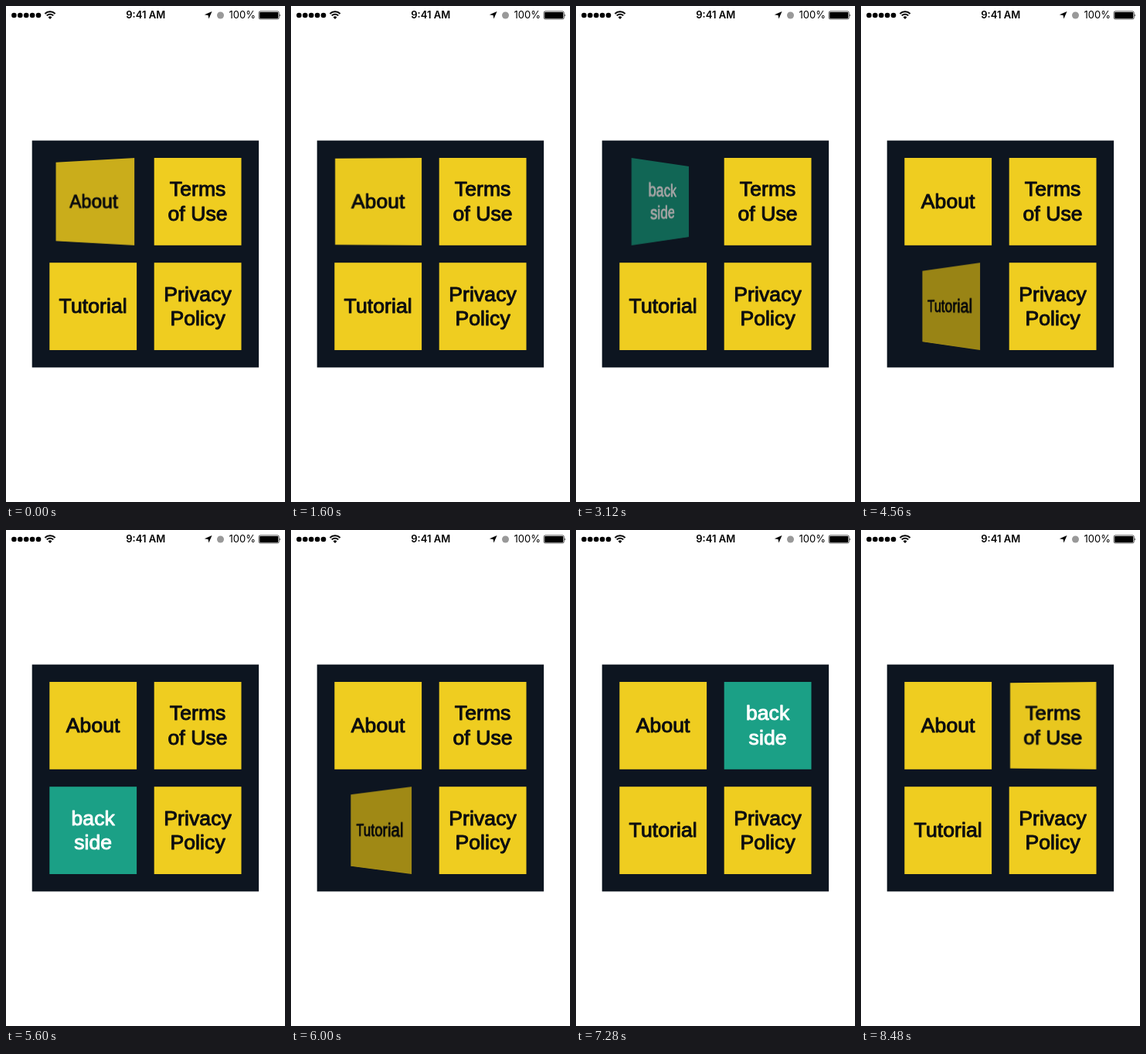
Recreate the animation shown at these times as an HTML page. Size 361 px wide and 640 px high, loop 8.56 s.

```html
<!DOCTYPE html>
<html lang="en">
<head>
<meta charset="utf-8">
<title>Flip tiles</title>
<style>
  html, body { margin: 0; width: 100%; height: 100%; overflow: hidden; background: #fff; }
  #scene { position: absolute; left: 0; top: 0; font-family: Inter, sans-serif; font-size: 13px; }
  .slot { position: absolute; width: 114px; height: 114px; perspective: 326px; perspective-origin: 56.8px 56.5px; }
  .face { width: 114px; height: 114px; transform-origin: 56.8px 56.5px; }
  .face svg { display: block; }
  .face text {
    font-family: "Liberation Sans", Arial, sans-serif; font-size: 26.5px; letter-spacing: .1px;
    text-anchor: middle; stroke-width: 1px; stroke-linejoin: round;
  }
  .front rect { fill: #efcd20; }
  .front text { fill: #0b0d10; stroke: #0b0d10; }
  .back rect { fill: #1ba086; }
  .back text { fill: #fff; stroke: #fff; }
</style>
</head>
<body>
<svg id="scene" width="361" height="640" viewBox="0 0 361 640">
  <g id="signal"></g>
  <g fill="none" stroke="#000" stroke-width="1.9">
    <path d="M50.4 10 A9.3 9.3 0 0 1 63.6 10"/>
    <path d="M52.7 12.4 A6 6 0 0 1 61.3 12.4"/>
  </g>
  <path d="M57 17 L54.6 14.4 A3.4 3.4 0 0 1 59.4 14.4 Z"/>
  <text x="180.7" y="16.3" text-anchor="middle" font-weight="600">9:41 AM</text>
  <path d="M266.5 7 L262.4 16.6 L261.6 11.9 L256.8 11.2 Z"/>
  <circle cx="277.5" cy="12" r="4.5" fill="#999"/>
  <text x="323" y="16.3" text-anchor="end">100%</text>
  <rect x="327.2" y="6.9" width="26" height="10" rx="1.8" fill="none" stroke="#000" stroke-width=".7"/>
  <rect x="328.2" y="7.9" width="24" height="8" rx=".8"/>
  <path d="M354 10.2 Q355.8 12 354 13.8 Z"/>
  <rect x="33.7" y="173.6" width="293.4" height="292.8" fill="#0d1520"/>
</svg>
<script>
const LOOP = 8560, STEP = 80, FLIP = 550, SIZE = 112.8;

// Each flip is [start, direction]: 1 turns to the back, -1 returns to the front.
const tiles = [
  { x: 56, y: 196, lines: ["About"], flips: [[-406, -1], [1544, 1], [2916, -1]] },
  { x: 191.4, y: 196, lines: ["Terms", "of Use"], flips: [[6690, 1], [8000, -1]] },
  { x: 56, y: 331.2, lines: ["Tutorial"], flips: [[4357, 1], [5647, -1]] },
  { x: 191.4, y: 331.2, lines: ["Privacy", "Policy"], flips: [] }
];

function makeFace(kind, lines, dx, dy) {
  const face = document.createElement("div");
  const first = lines.length > 1 ? 49.4 : 65.3;
  const text = lines.map((line, i) =>
    `<text x="56.4" y="${first + i * 31.6}">${line}</text>`).join("");
  face.className = "face " + kind;
  face.innerHTML = `<svg width="114" height="114"><g transform="translate(${dx} ${dy})">` +
    `<rect width="${SIZE}" height="${SIZE}"/>${text}</g></svg>`;
  return face;
}

for (const tile of tiles) {
  const slot = document.createElement("div");
  const left = Math.floor(tile.x), top = Math.floor(tile.y);
  const offset = [tile.x - left + 0.3, tile.y - top];
  slot.className = "slot";
  slot.style.left = left + "px";
  slot.style.top = top + "px";
  tile.front = makeFace("front", tile.lines, ...offset);
  tile.back = makeFace("back", ["back", "side"], ...offset);
  slot.append(tile.front, tile.back);
  document.body.append(slot);
}

document.getElementById("signal").innerHTML = [0, 1, 2, 3, 4].map(i =>
  `<circle cx="${10.4 + i * 7.9}" cy="12" r="3.3"/>`).join("");

// Cubic Bezier ease with handles (.55, 0) and (.45, 1).
function ease(p) {
  if (p <= 0) return 0;
  if (p >= 1) return 1;
  let lo = 0, hi = 1;
  for (let i = 0; i < 24; i++) {
    const s = (lo + hi) / 2, r = 1 - s;
    const x = 1.65 * s * r * r + 1.35 * s * s * r + s * s * s;
    if (x < p) lo = s; else hi = s;
  }
  return lo * lo * (3 - 2 * lo);
}

function turnAt(flips, t) {
  let turn = 0;
  for (const [start, dir] of flips) {
    if (t < start) break;
    const k = ease((t - start) / FLIP);
    turn = dir > 0 ? k : 1 - k;
  }
  return turn;
}

function pose(tile, t) {
  const turn = turnAt(tile.flips, t);
  const isBack = turn > 0.5;
  const face = isBack ? tile.back : tile.front;
  const tilt = 180 * (isBack ? 1 - turn : turn);
  const depth = SIZE / 2 * Math.sin(tilt * Math.PI / 180);
  tile.front.style.display = isBack ? "none" : "block";
  tile.back.style.display = isBack ? "block" : "none";
  // The nearer edge stays in the plane of the screen.
  face.style.transform = tilt < 0.01 ? "none"
    : `translateZ(${-depth}px) rotateY(${isBack ? tilt : -tilt}deg)`;
  face.style.filter = tilt < 0.01 ? "none" : `brightness(${1 - 0.75 * tilt / 90})`;
}

function draw(ms) {
  const t = Math.floor(ms % LOOP / STEP) * STEP;
  for (const tile of tiles) pose(tile, t);
}

const begin = performance.now();
function tick() {
  draw(performance.now() - begin);
  requestAnimationFrame(tick);
}
tick();
</script>
</body>
</html>
```
